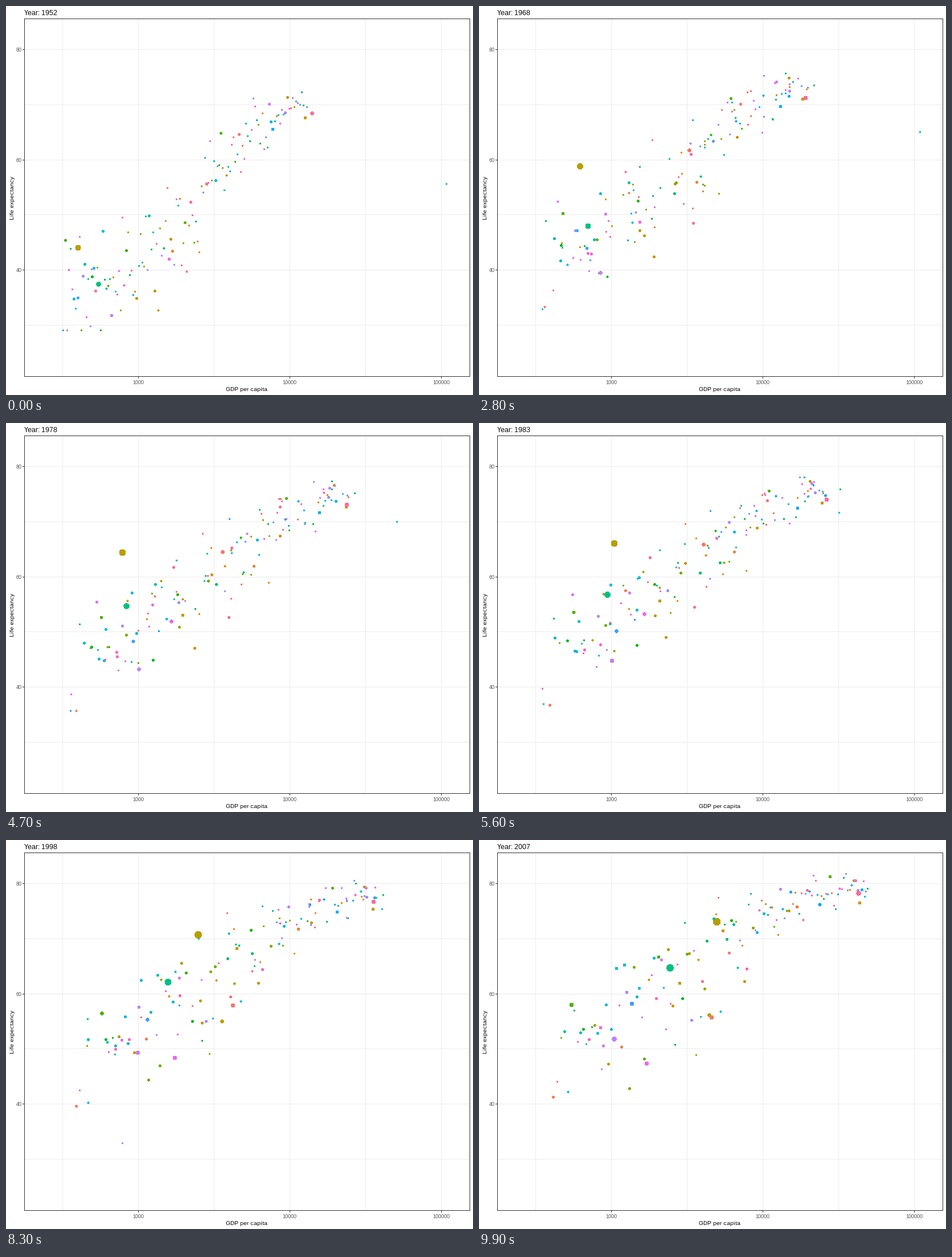
Recreate the animation shown at these times as a matplotlib script. Size 820 by 683 pixels, loop 10000 ms.

```python
import numpy as np
import matplotlib.pyplot as plt
from matplotlib.animation import FuncAnimation

W, H, DPI = 820, 683, 64
PT = 72 / DPI
FRAMES, STEP = 100, 9
COUNT = 142
YEARS = np.arange(1952, 2008, 5)
LEFT, RIGHT, TOP, BOTTOM = 32, 814, 22, 650
X_RANGE = (2.24868, 5.18872)
Y_RANGE = (20.65, 85.55)

# Countries that stand out: colour rank -> population span (m) and
# a few (year, income, life expectancy) points.
LEADERS = {
    25: (556, 1318, [(1952, 400, 44), (1962, 488, 44.5), (1967, 613, 58.4),
                     (1977, 741, 64), (1997, 2289, 70.4), (2007, 4959, 73)]),
    59: (372, 1110, [(1952, 547, 37.4), (1977, 813, 54.2),
                     (1992, 1164, 60.2), (2007, 2452, 64.7)]),
    72: (0.2, 2.5, [(1952, 108382, 55.6), (1972, 109348, 67.7),
                    (1982, 31354, 71.3), (2007, 47307, 77.6)]),
    108: (2.5, 8.9, [(1952, 493, 40), (1987, 848, 44),
                     (1992, 737, 23.6), (2007, 863, 46.2)]),
    135: (158, 301, [(1952, 13990, 68.4), (2007, 42952, 78.2)]),
}


def hcl(hue, chroma=100, light=65):
    """Polar CIELUV colour as sRGB."""
    h = np.radians(hue)
    u = chroma * np.cos(h) / (13 * light) + 0.1978
    v = chroma * np.sin(h) / (13 * light) + 0.4683
    y = ((light + 16) / 116) ** 3
    x, z = y * 9 * u / (4 * v), y * (12 - 3 * u - 20 * v) / (4 * v)
    rgb = np.array([3.2406 * x - 1.5372 * y - 0.4986 * z,
                    -0.9689 * x + 1.8758 * y + 0.0415 * z,
                    0.0557 * x - 0.2040 * y + 1.0570 * z]).clip(0, 1)
    return np.where(rgb > 0.0031308, 1.055 * rgb ** (1 / 2.4) - 0.055, 12.92 * rgb)


def to_x(log_gdp):
    lo, hi = X_RANGE
    return LEFT + 0.5 + (log_gdp - lo) / (hi - lo) * (RIGHT - LEFT)


def to_y(life):
    lo, hi = Y_RANGE
    return BOTTOM - (life - lo) / (hi - lo) * (BOTTOM - TOP - 0.5)


def crowd(n, s):
    """Small countries climbing from the 1952 curve to the 2007 curve."""
    rng = np.random.default_rng(7)
    even = (np.arange(n) + 0.5) / n
    u0 = rng.permutation(even)
    u1 = even[np.argsort(np.argsort(u0 + rng.normal(0, 0.12, n)))]

    # Income is spread by rank, life expectancy follows income.
    x0 = 2.5 + 1.62 * u0
    x1 = 2.6 + 2.1 * u1 ** 0.85
    luck = rng.normal(0, 1, n).clip(-2, 2)
    y0 = 36 + 36 / (1 + np.exp(4.5 * (3.45 - x0))) + luck * (1.2 + 4.8 * (1 - u0 ** 2))
    y1 = 46 + 35 * (1 - np.exp(-((x1 - 2.4) / 1.15) ** 1.6)) + luck * (1.2 + 4 * (1 - u1))

    rise, arch = s ** 0.75, np.sin(np.pi * s)
    bend = rng.normal(0, 0.06, n) + rng.normal(0, 0.03, (len(s), n))
    gdp = x0 + (x1 - x0) * rise + arch * bend

    # Some poorer countries lose years again from the late eighties.
    hit = (rng.random(n) < 0.25) & (u1 > 0.1) & (u1 < 0.6)
    loss = hit * rng.uniform(7, 16, n) * ((s - 0.64) / 0.27).clip(0, 1)
    life = (y0 + (y1 - y0) * rise - loss).clip(29, 82.3)

    start = np.exp(rng.normal(1.5, 1.3, n)).clip(0.06, 90)
    growth = 1.3 + 2.2 * ((67 - y0) / 20).clip(0, 1)
    return gdp, life, start * growth ** s


def build():
    """Positions and sizes at each survey year."""
    s = (YEARS - 1952) / 55
    data = np.zeros((3, len(YEARS), COUNT))
    for rank, (p0, p1, keys) in LEADERS.items():
        when, income, age = zip(*keys)
        data[:, :, rank - 1] = (np.interp(YEARS, when, np.log10(income)),
                                np.interp(YEARS, when, age),
                                p0 * (p1 / p0) ** s)
    rest = [i for i in range(COUNT) if i + 1 not in LEADERS]
    data[:, :, rest] = crowd(len(rest), s[:, None])
    gdp, life, pop = data
    return to_x(gdp), to_y(life), 1 + 5 * np.sqrt(pop / 1318)


TRACKS = build()
COLORS = [hcl(15 + 360 * i / COUNT) for i in range(COUNT)]

plt.rcParams.update({"font.family": "Liberation Sans",
                     "text.hinting": "native", "text.hinting_factor": 1})
fig = plt.figure(figsize=(W / DPI, H / DPI), dpi=DPI, facecolor="white")
ax = fig.add_axes([0, 0, 1, 1])
ax.set(xlim=(0, W), ylim=(H, 0))
ax.axis("off")


def line(xs, ys, color="#333333", z=4):
    # Whole coordinates snap to the pixel that starts there.
    ax.plot(xs, ys, color=color, lw=PT, aa=False, zorder=z, snap=True,
            solid_capstyle="butt", solid_joinstyle="miter")


def label(x, y, text, size, color="black", ha="center", **kw):
    return ax.text(x, y, text, fontsize=size * PT, color=color, ha=ha,
                   va="baseline", **kw)


for k in np.arange(2.5, 5.1, 0.5):
    x = round(to_x(k))
    line([x, x], [TOP, BOTTOM], "#ebebeb", 1)
    if k % 1 == 0:
        line([x, x], [BOTTOM, BOTTOM + 3])
        label(x, 663.5, f"{10 ** int(k)}", 9, "#4d4d4d")
for v in range(30, 81, 10):
    y = round(to_y(v))
    line([LEFT, RIGHT], [y, y], "#ebebeb", 1)
    if v % 20 == 0:
        line([LEFT - 3, LEFT], [y, y])
        label(28, y + 4, str(v), 9, "#4d4d4d", "right")
line([LEFT, RIGHT, RIGHT, LEFT, LEFT], [TOP, TOP, BOTTOM, BOTTOM, TOP])

label(423, 676.5, "GDP per capita", 10)
label(14.5, 337, "Life expectancy", 10, rotation=90, rotation_mode="anchor")
title = label(32, 16, "", 12, ha="left")
dots = ax.scatter(TRACKS[0][0], TRACKS[1][0], c=COLORS, linewidths=0,
                  antialiased=False, zorder=3)


def draw(i):
    a, f = divmod(i, STEP)
    b = min(a + 1, len(YEARS) - 1)
    x, y, size = (v[a] + (v[b] - v[a]) * f / STEP for v in TRACKS)
    dots.set_offsets(np.floor(np.column_stack([x, y])) + 0.5)
    radius = (size * 2.845 + 0.945) * 0.375 - 0.35
    dots.set_sizes((2 * radius * PT) ** 2)
    title.set_text(f"Year: {round(1952 + 55 * i / (FRAMES - 1))}")
    return dots, title


anim = FuncAnimation(fig, draw, frames=FRAMES, interval=100, repeat=True,
                     repeat_delay=0, blit=False)
plt.show()
```
